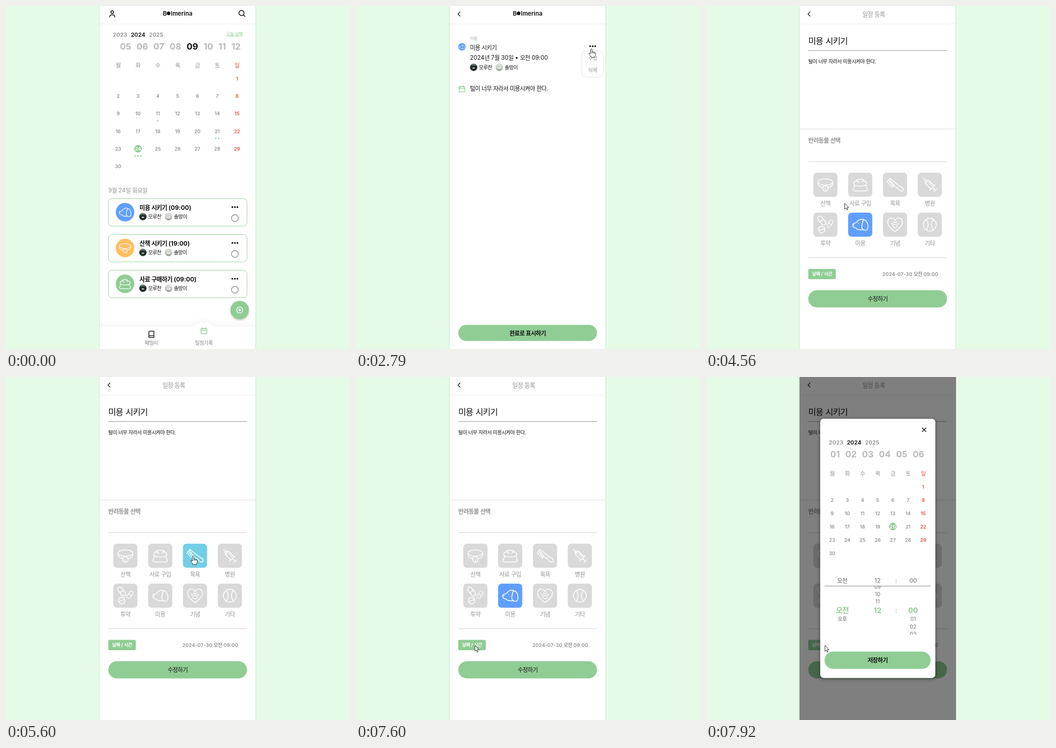
An HTML page for the animation above (8 s loop, 750 by 747 pixels).

```html
<!DOCTYPE html>
<html lang="ko">
<head>
<meta charset="utf-8">
<title>일정 기록</title>
<style>
html, body { margin: 0; width: 100%; height: 100%; overflow: hidden; background: #e5fbe8; }
svg { display: block; width: 100vw; height: 100vh; }
text { font-family: Inter, 'Noto Sans CJK KR', 'Noto Sans CJK', 'Noto Sans', sans-serif; white-space: pre; }
.k { letter-spacing: -.055em; }
.row { word-spacing: .38em; }
.line { fill: none; stroke-linecap: round; stroke-linejoin: round; }
.nav { filter: drop-shadow(0 -4px 6px rgba(0,0,0,.045)); }
.fab { filter: drop-shadow(0 2px 2px rgba(0,0,0,.25)); }
.menu { filter: drop-shadow(0 0 2px rgba(0,0,0,.16)); }
.sheet { filter: drop-shadow(0 2px 4px rgba(0,0,0,.45)); }
</style>
</head>
<body>
<svg id="stage" viewBox="0 0 750 747" preserveAspectRatio="none"></svg>
<script>
const GREEN = '#90cd94', BLUE = '#609fff', ORANGE = '#ffbf5e', GRAY = '#929292', RED = '#e2513f', OFF = '#d9d9d9', INK = '#111';
const PETS = ['모루찬', '솔방이'];
const TASK = '미용 시키기', NOTE = '털이 너무 자라서 미용시켜야 한다.';
const stage = document.getElementById('stage');

// ---- drawing helpers ----
const text = (x, y, s, size, fill = INK, weight = 400, anchor = 'start', extra = '') =>
  `<text x="${x}" y="${y}" font-size="${size}" fill="${fill}" font-weight="${weight}" text-anchor="${anchor}" ${extra}>` +
  s.replace(/[가-힣]+/g, m => `<tspan class="k">${m}</tspan>`) + '</text>';
const mid = (x, cy, s, size, fill, weight) => text(x, cy + size * .364, s, size, fill, weight, 'middle');
const rect = (x, y, w, h, r, fill, extra = '') =>
  `<rect x="${x}" y="${y}" width="${w}" height="${h}" rx="${r}" fill="${fill}" ${extra}/>`;
const disc = (x, y, r, fill, extra = '') => `<circle cx="${x}" cy="${y}" r="${r}" fill="${fill}" ${extra}/>`;
const line = (d, stroke, width = 1.5) => `<path class="line" d="${d}" stroke="${stroke}" stroke-width="${width}"/>`;
const ring = (x, y, r, stroke, width = 1.5) => disc(x, y, r, 'none', `stroke="${stroke}" stroke-width="${width}"`);
const at = (x, y, s, body) => `<g transform="translate(${x} ${y}) scale(${s})">${body}</g>`;
const group = (id, body) => `<g id="${id}">${body}</g>`;
const rule = (y, color, width = 1.2, x = 223, x2 = 525.5) => rect(x, y - width / 2, x2 - x, width, 0, color);
const repeat = (n, fn) => Array.from({ length: n }, (_, i) => fn(i)).join('');
const two = n => String(n).padStart(2, '0');

// ---- icons, centred on 0,0 ----
const paths = {
  collar: 'M-16-6a16 7 0 0 1 32 0a16 7 0 0 1-32 0v5q1 5 10 7M16-6v5q-1 5-10 7M-6 8a6 6 0 0 1 12 0a6 6 0 0 1-12 0M0 8v4',
  bowl: 'M-12 1L-15.5 9Q-16 13.5-12 13.5H12Q16 13.5 15.5 9L12 1M-12 1a5 5 0 0 1 3-9a6 6 0 0 1 9-3a6 6 0 0 1 9 3a5 5 0 0 1 3 9Q0 5-12 1M-9-8q4-1 6 3M9-8q-4-1-5 2',
  brush: 'M-11-14L5-1Q10 3 16 6Q19 10 17 13Q14 15 10 12Q5 6 0 4L-13-12Z',
  syringe: 'M-9-5H8V5H-9ZM8 0H17M17-4V4M8-8V8M-9-2.5H-13V2.5H-9M-13 0H-20M-4-5v4M0-5v4M4-5v4',
  capsule: 'M-6-5H6a5 5 0 0 1 0 10H-6a5 5 0 0 1 0-10M0-5V5',
  dog: 'M-16-1Q-15-4-11-3.5C-7-4-6-12 4-12Q7-12 9-10M-16-1C-17 5-13 7-9 7Q-7 11 0 11H7M7-10C12-12 17-4 17 4C17 10 14 13 11 12C5 12 2 6 4 0Q5-7 7-10M-16 0h3M-4-3v.5',
  heart: 'M0 15C-8 9-16 3-16-5C-16-16-4-17 0-9C4-17 16-16 16-5C16 3 8 9 0 15Z',
  ball: 'M-8-11.5q9 11.5 0 23M8-11.5q-9 11.5 0 23'
};
function icon(name, width = 1.7) {
  const draw = (key = name) => line(paths[key], '#fff', width);
  const turn = (deg, body) => `<g transform="rotate(${deg})">${body}</g>`;
  if (name === 'syringe') return turn(45, draw());
  if (name === 'ball') return draw() + ring(0, 0, 14, '#fff', width);
  if (name === 'brush') return draw() + repeat(5, i => line(`M${2.8 * i - 14} ${2.8 * i - 11}l-3.5 6`, '#fff', width));
  if (name === 'heart') return draw() + '<ellipse class="line" cy="3" rx="5" ry="3.6" stroke="#fff" stroke-width="1.5"/>' +
    repeat(4, i => disc(4.7 * (i - 1.5), i % 3 ? -5 : -2, 1.5, '#fff'));
  if (name === 'pills') return at(-8, -9, 1, turn(50, draw('capsule'))) + at(10, -2, .8, turn(-55, draw('capsule'))) +
    ring(-8, 10.5, 7, '#fff', width) + line('M-14 13l12-5', '#fff', width);
  return draw();
}
const calendar = (x, y) => at(x, y, 1, line('M-6.2-4.8h12.4v11.4h-12.4zM-6.2-.8h12.4M-3-7v4M3-7v4', GREEN));
const dots = (x, y, n, gap, r, fill) => repeat(n, i => disc(x + gap * (i - (n - 1) / 2), y, r, fill));
const more = (x, y) => dots(x, y, 3, 5.5, 1.9, INK);
const pets = (x, y) => PETS.map((name, i) => at(x + 56 * i, y, 1,
  disc(0, 0, 7.8, `url(#pet${i})`, `stroke="${i ? '#a9bfa9' : '#4b5f55'}" stroke-width=".7"`) +
  `<ellipse cy="1.5" rx="${3 + 2 * i}" ry="${1.2 + i}" fill="#e0e4e2"/>` + text(11.5, 4, name, 11))).join('');
const back = line('M226.8 13L222.4 17.5L226.8 22', INK);
const brand = text(342, 20.5, 'B', 13, INK, 600) + disc(354.5, 16, 3.9, INK) + text(359.5, 20.5, 'lmerina', 13, INK, 600);
const pill = (x, y, w, h, label, weight) => rect(x, y, w, h, h / 2, GREEN) + mid(x + w / 2, y + h / 2, label, 12.6, INK, weight);

// ---- calendar parts ----
const marks = { 11: 1, 21: 2, 24: 3 };
function month(x, dx, weekY, y, dy, chosen, marked) {
  const color = col => col < 6 ? GRAY : RED;
  return [...'월화수목금토일'].map((c, i) => mid(x + dx * i, weekY, c, 12.4, color(i), 500)).join('') +
    repeat(30, i => {
      const day = i + 1, col = (i + 6) % 7, cx = x + dx * col, cy = y + dy * Math.floor((i + 6) / 7), on = day === chosen;
      return (on ? disc(cx, cy, 8.2, GREEN) : '') + mid(cx, cy, '' + day, on ? 11 : 10.5, on ? '#fff' : color(col), 600) +
        (marked && marks[day] ? dots(cx, cy + 15.6, marks[day], 6.2, 1.6, GREEN) : '');
    });
}
// a run of labels with one of them dark
const strip = (list, chosen) => list.map(s => s === chosen ? `<tspan fill="${INK}">${s}</tspan>` : s).join(' ');
const years = (x, y) => text(x, y, strip(['2023', '2024', '2025'], '2024'), 12.4, GRAY, 600, 'start', 'class="row"');
const months = (cx, y, first, n, chosen) =>
  text(cx, y, strip(Array.from({ length: n }, (_, i) => two(first + i)), chosen), 19, '#bababa', 700, 'middle', 'class="row"');

// ---- pages ----
function listPage() {
  const cards = [[TASK + ' (09:00)', 'dog', BLUE], ['산책 시키기 (19:00)', 'collar', ORANGE], ['사료 구매하기 (09:00)', 'bowl', GREEN]];
  return brand + ring(231.7, 13.3, 3, INK, 1.7) + line('M226.3 24v-1.2a3.4 3.4 0 0 1 3.4-3.4h4a3.4 3.4 0 0 1 3.4 3.4V24', INK, 1.7) +
    ring(513.5, 15.3, 5.6, INK, 1.7) + line('M517.6 19.4l3.4 3.3', INK, 1.7) +
    years(232.8, 66.5) + text(516, 64, '오늘 날짜', 9.5, GREEN, 400, 'end', 'text-decoration="underline"') +
    months(380, 95, 5, 8, '09') + month(244.5, 43.2, 129, 158, 38.25, 24, true) +
    text(223, 406, '9월 24일 화요일', 12.6, GRAY) +
    cards.map(([title, name, color], i) => at(0, 78 * i, 1,
      rect(223.5, 419.5, 302, 59.8, 8, '#fff', `stroke="${GREEN}"`) + disc(259.5, 449, 20.2, color) +
      at(259.5, 449.3, .77, icon(name)) + text(291, 444, title, 13.2, INK, 700) + pets(298.5, 458.7) +
      more(499, 438) + ring(499, 462, 7.4, '#8b8b8b'))).join('') +
    disc(509.5, 662, 20, GREEN, 'class="fab"') + ring(509.5, 662, 6.6, '#fff') + line('M506.5 662h6M509.5 659v6', '#fff') +
    '<path class="nav" fill="#fff" d="M204 698H404C412 698 414 689 431 689S450 698 458 698H544V750H204Z"/>' +
    line('M311.5 719.5V710a1.7 1.7 0 0 1 1.7-1.7h9.3V722h-9.3a1.9 1.9 0 0 1 0-3.8h9.3', INK, 1.6) + calendar(431.5, 707.2) +
    mid(317, 733.5, '패밀리', 11.1, '#858585', 500) + mid(431.3, 733.5, '일정기록', 11.1, '#858585', 500);
}
function detailPage() {
  return back + brand + text(248.5, 74, '미용', 9.3, '#aaa') +
    disc(231, 89, 8.2, BLUE) + at(231, 89.2, .36, icon('dog', 1.9)) +
    text(248.5, 94.6, TASK, 12.6) + more(516, 87.6) +
    text(248.5, 116.5, '2024년 7월 30일 • 오전 09:00', 12.7) + pets(256.5, 133.6) +
    calendar(231, 180.5) + text(248.5, 184.3, NOTE, 12.6) + pill(223, 694.5, 302.5, 35, '완료로 표시하기', 700) +
    group('menu', rect(493.5, 99.5, 45, 54.5, 8, '#fff', 'class="menu"') + rule(127, '#eee', 1, 500, 532) +
      mid(516, 114, '수정', 11.3, GRAY, 500) + mid(516, 140.2, '삭제', 11.3, GRAY, 500));
}
const tiles = [['산책', 'collar', ORANGE], ['사료 구입', 'bowl', GREEN], ['목욕', 'brush', '#72cfe6'], ['병원', 'syringe'],
  ['투약', 'pills'], ['미용', 'dog', BLUE], ['기념', 'heart'], ['기타', 'ball']];
const grid = { x: 234, y: 363, dx: 75.9, dy: 87, size: 52.6 };
function editPage() {
  return back + text(365.5, 22.8, '일정 등록', 13.2, GRAY, 500, 'middle') +
    text(223, 82.8, TASK, 18.6) + rule(97, '#aaa', 1.4) +
    text(223, 125, NOTE, 10.95) + rect(204, 266, 340, 4, 0, '#f3f3f3') +
    text(223, 296.6, '반려동물 선택', 12.9, GRAY, 700) + rule(339, '#d8d5cf') +
    tiles.map(([label, name], i) => at(grid.x + grid.dx * (i % 4), grid.y + grid.dy * (i >> 2), 1,
      rect(0, 0, grid.size, grid.size, 8, OFF, `id="tile${i}"`) + at(grid.size / 2, grid.size / 2, 1, icon(name)) +
      mid(grid.size / 2, 66.4, label, 12.6, GRAY, 400))).join('') + rule(548.3, '#d8d5cf') +
    rect(223, 572.5, 60, 22.5, 3, GREEN) + mid(253, 583.8, '날짜 / 시간', 10, '#fff', 700) +
    text(506, 587.8, '2024-07-30 오전 09:00', 10.9, GRAY, 600, 'end') + pill(223, 619, 302.5, 37.5, '수정하기', 400);
}
// The shade surrounds the sheet and leaves its own area clear.
function pickerSheet() {
  const time = (y, size, fill, weight) => mid(297, y, '오전', size, fill, weight) +
    mid(374, y, '12', size, fill, weight) + mid(414.5, y, ':', 12.6, GRAY, 600) + mid(451.5, y, '00', size, fill, weight);
  return '<path fill-opacity=".5" fill-rule="evenodd" d="M-400-400H1200V1200H-400ZM257 91H492a8 8 0 0 1 8 8V647.5a8 8 0 0 1-8 8H257a8 8 0 0 1-8-8V99a8 8 0 0 1 8-8Z"/>' +
    rect(249, 91, 251, 564.5, 8, '#fff', 'class="sheet"') + line('M471.5 111l8 8M479.5 111l-8 8', INK, 1.7) +
    years(267.8, 146.5) + months(373.5, 174.9, 1, 6) + month(275, 33.1, 210, 238.7, 29, 20) +
    time(443, 12.7, GRAY, 600) + time(508.2, 16, GREEN, 700) + mid(297, 527, '오후', 11.2, GRAY, 600) +
    '<g clip-path="url(#wheel)">' + repeat(3, i => mid(374, 456.5 + 16.3 * i, two(9 + i), 11.2, GRAY, 600) +
      mid(451.5, 527 + 16.5 * i, two(1 + i), 11.2, GRAY, 600)) + '</g>' +
    rule(455.3, '#8d8d8d', 1.2, 258.5, 490) + pill(258.5, 598, 231.5, 37.7, '저장하기', 600);
}

stage.innerHTML = `<defs>
<clipPath id="panel"><rect x="204" width="341" height="747"/></clipPath>
<clipPath id="wheel"><rect x="250" y="456" width="249" height="105"/></clipPath>
<linearGradient id="pet0" x2="0" y2="1"><stop stop-color="#87958f"/><stop offset=".4" stop-color="#1b2622"/><stop offset="1" stop-color="#26312d"/></linearGradient>
<linearGradient id="pet1" x2="0" y2="1"><stop stop-color="#e3e6e1"/><stop offset=".5" stop-color="#c9cbc6"/><stop offset="1" stop-color="#8f938c"/></linearGradient>
</defs>` + rect(0, 0, 750, 747, 0, '#e5fbe8') + rect(203, 0, 342, 747, 0, '#bfebc8') + rect(204, 0, 340, 747, 0, '#fff') +
  '<g clip-path="url(#panel)">' + rule(39, '#eee', 1.2, 204, 544) +
  group('list', listPage()) + group('detail', detailPage()) + group('edit', editPage()) + group('sheet', pickerSheet()) + '</g>' +
  group('cursor', disc(0, 0, 9.7, '#f0e83a', 'id="glow" opacity=".75"') +
    '<g fill="#fff" stroke="#222" stroke-width="1" stroke-linejoin="round">' +
    '<path id="arrow" d="M.3 .3V13.4L3.2 10.8L5.2 15.3L7.2 14.4L5.2 10H9.2Z"/>' +
    '<path id="hand" d="M-1.6 1.6Q-1.4 0 0 0T1.6 1.6V7Q3.4 5.6 4.4 7.3Q6 6.2 6.8 8Q9 7.4 9 9.6V13Q9 15 7.4 16.6V18.6H-.6V17Q-2.5 14.6-4.8 11Q-5.4 8.6-3.4 9L-1.6 11ZM1.6 7V10M4.4 7.3V10M6.8 8V10"/></g>');

// ---- motion ----
// The pointer travels during `go`; a press glows during `click`, then takes effect.
const STEP = 80;
const trips = [
  { go: [80, 430], to: [251, 441], click: [520, 870], effect: { page: 'detail' } },
  { go: [870, 870], to: [366, 439] },
  { go: [1610, 1610], to: [361, 379] },
  { go: [1610, 2260], to: [513, 87], click: [2350, 2440], effect: { menu: true } },
  { go: [2710, 3030], to: [513, 112], click: [3350, 3510], effect: { page: 'edit' } },
  { go: [4000, 4560], to: [302, 429] },
  { go: [4560, 4720], to: [332, 394], click: [4800, 4880], effect: { pick: 1 } },
  { go: [4970, 5370], to: [408, 390], click: [5450, 5530], effect: { pick: 2 } },
  { go: [5530, 5850], to: [278, 391], click: [5910, 5990], effect: { pick: 0 } },
  { go: [5990, 6550], to: [331, 470], click: [6710, 6790], effect: { pick: 5 } },
  { go: [6880, 7440], to: [259, 584], click: [7520, 7600], effect: { opened: 7600 } }
];
const stepped = (t, start) => Math.floor((t - start) / STEP) * STEP;

function stateAt(t) {
  const s = { page: 'list', pick: 5, x: 660, y: 731, glow: false };
  for (const { go: [a, b], to, click, effect } of trips) {
    if (t < a) break;
    const u = t >= b ? 1 : stepped(t, a) / (b - a);
    s.x += (to[0] - s.x) * u;
    s.y += (to[1] - s.y) * u;
    if (!click) continue;
    s.glow = t >= click[0] && t < click[1];
    if (t >= click[1]) Object.assign(s, effect);
  }
  return s;
}
// Is the pointer over something that can be pressed?
function hot({ page, x, y, opened }) {
  const inside = (l, t, r, b) => x >= l && x <= r && y >= t && y <= b;
  if (opened) return false;
  if (page === 'list') return inside(223, 419, 526, 636) && (y - 419) % 78 < 60;
  if (page === 'detail') return inside(500, 82, 539, 154);
  return inside(223, 572, 283, 595) ||
    inside(grid.x, grid.y, 515, 503) && (x - grid.x) % grid.dx < grid.size && (y - grid.y) % grid.dy < grid.size;
}

const $ = id => document.getElementById(id);
const show = (id, on) => $(id).setAttribute('display', on ? 'inline' : 'none');

function draw(t) {
  const s = stateAt(t);
  for (const page of ['list', 'detail', 'edit']) show(page, s.page === page);
  show('menu', s.menu);
  tiles.forEach((tile, i) => $('tile' + i).setAttribute('fill', i === s.pick ? tile[2] : OFF));

  const p = s.opened ? Math.min(1, stepped(t, s.opened) / 267) : 0;
  $('sheet').setAttribute('opacity', p);
  $('sheet').setAttribute('transform', `translate(374.5 373.3) scale(${.75 + .25 * p}) translate(-374.5 -373.3)`);

  const over = hot(s);
  $('cursor').setAttribute('transform', `translate(${s.x} ${s.y})`);
  show('cursor', t >= 160);
  show('arrow', !over);
  show('hand', over);
  show('glow', s.glow);
}
function loop() {
  draw(performance.now() % 8000);
  requestAnimationFrame(loop);
}
loop();
</script>
</body>
</html>
```
